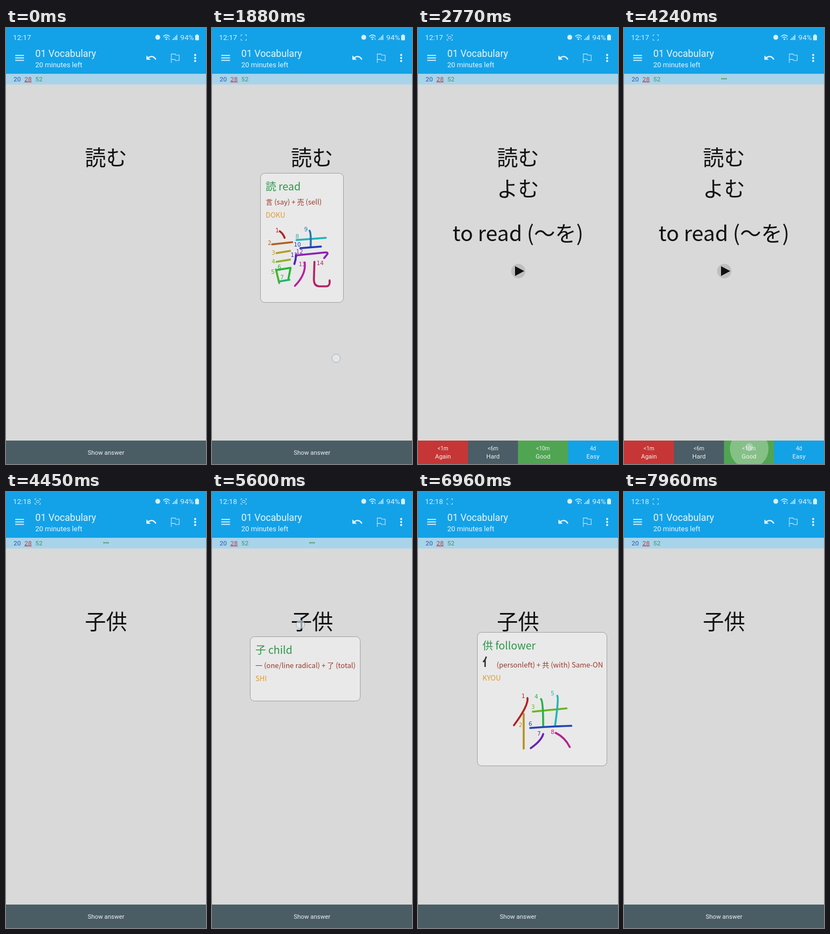
An HTML page that plays this animation: 369x800 px, repeating every 8 s.

```html
<!DOCTYPE html>
<html lang="en">
<head>
<meta charset="utf-8">
<title>Flashcard review</title>
<style>
  html, body { margin: 0; width: 100%; height: 100%; overflow: hidden; background: #d9d9d9; }
  svg { display: block; width: 369px; height: 800px; font-family: Roboto, sans-serif; }
  .card, .pop { font-family: "Noto Sans CJK JP", "Noto Sans CJK", "Noto Sans", sans-serif; }
  .card { font-size: 39px; fill: #111; text-anchor: middle; }
  .pop { font-size: 13px; }
  .pop .head { font-size: 19.4px; fill: #2b9648; }
  .pop .parts { fill: #9c3a2b; }
  .pop .on { fill: #dc9c31; }
  .pop .num { font: 10.3px "DejaVu Sans", sans-serif; }
  .ink { fill: none; stroke-width: 3.6; stroke-linecap: round; stroke-linejoin: round; }
  .line { fill: none; stroke: #e4f3fb; }
  .bottom { fill: #eef1f2; font-size: 11.4px; text-anchor: middle; }
  .bottom .due { font-size: 10px; }
  .count { font-size: 11.8px; }
</style>
</head>
<body>
<svg viewBox="0 0 369 800">
  <defs>
    <clipPath id="barClip"><path d="M0 757h369v43H0z"/></clipPath>
    <clipPath id="goodClip"><path d="M184 757h93v43h-93z"/></clipPath>
  </defs>
  <rect width="369" height="800" fill="#d9d9d9"/>

  <rect width="369" height="84" fill="#13a2e8"/>
  <g fill="#d9effa">
    <text id="clock" x="13" y="22" font-size="13.4">12:17</text>
    <text x="321.5" y="22" font-size="13.6">94%</text>
    <circle cx="280" cy="17" r="4.5"/>
    <rect x="349" y="13" width="7" height="9.5" rx="1"/>
    <rect x="351" y="11.8" width="3" height="2"/>
    <path d="M307 22v-2h1.5v2zM309.5 22v-4.5h1.5v4.5zM312 22v-7h1.5v7zM314.5 22v-9.5h1.5v9.5z"/>
    <circle cx="296" cy="20.5" r="1.5"/>
    <path d="M300.5 22v-3.5h1v3.5z"/>
  </g>
  <g class="line" stroke-width="1.3">
    <path d="M290 15.500q6-5.500 12 0M292.500 18q3.500-3 7 0"/>
    <g id="scan" stroke="#bfe4f7" stroke-width="1">
      <path d="M53.500 15v-2.500h2.500M61 12.500h2.500v2.500M63.500 20v2.500h-2.500M56 22.500h-2.500v-2.500"/>
      <rect id="scanCore" x="56" y="15.500" width="5" height="4" rx="1"/>
    </g>
    <path d="M17 50.300h16.200M17 54.800h16.200M17 59.300h16.200" stroke-width="1.800"/>
    <path d="M305 64V47.600h7l1 2.200h6.500v10h-6.700l-1-2.200H305" stroke="#c8e6f7" stroke-width="1.100"/>
  </g>
  <g fill="#eaf5fb">
    <text x="54" y="53" font-size="17.700">01 Vocabulary</text>
    <text x="54" y="71.500" font-size="13">20 minutes left</text>
    <path transform="translate(257.200 44) scale(.898)" d="M12.500 8c-2.650 0-5.050 1-6.900 2.600L2 7v9h9l-3.600-3.600c1.400-1.200 3.100-1.900 5.100-1.900 3.500 0 6.500 2.300 7.600 5.500l2.400-.8C21.100 11 17.100 8 12.500 8z"/>
    <circle cx="349" cy="49.500" r="1.900"/><circle cx="349" cy="55" r="1.900"/><circle cx="349" cy="60.500" r="1.900"/>
  </g>

  <rect y="84" width="369" height="19.500" fill="#a7d4ea"/>
  <g class="count">
    <text x="14" y="97.500" fill="#3450b4">20</text>
    <text x="34" y="97.500" fill="#c33a45" text-decoration="underline">28</text>
    <text x="54" y="97.500" fill="#478f62">52</text>
  </g>
  <g id="dots" fill="#4b9b58">
    <circle cx="181" cy="93.200" r="1.350"/><circle cx="184.600" cy="93.200" r="1.350"/><circle cx="188.200" cy="93.200" r="1.350"/>
  </g>

  <g class="card">
    <text id="word" x="184.500" y="252.200">読む</text>
    <g id="answer">
      <text x="184.500" y="309">よむ</text>
      <text x="184.500" y="390.500">to read (〜を)</text>
      <circle cx="185" cy="446" r="13.200" fill="#bfbfbf"/>
      <path d="M179 437l17 9-17 9z"/>
    </g>
  </g>

  <g class="bottom">
    <rect y="757" width="369" height="43" fill="#4a5d65"/>
    <circle id="showRipple" cx="211" cy="775" fill="#fff" clip-path="url(#barClip)"/>
    <text x="184.500" y="783">Show answer</text>
    <g id="buttons"></g>
  </g>

  <g id="popups"></g>
  <circle id="touch" r="7.700" fill="#eaeef4" fill-opacity=".6" stroke="#8d9fb5" stroke-opacity=".75"/>
</svg>
<script>
const LOOP = 8000;
const $ = id => document.getElementById(id);
const clamp = v => Math.max(0, Math.min(1, v));
const setOpacity = (el, v) => el.setAttribute('opacity', v);
// Opacity of something visible from a to b, with optional fades.
const vis = (t, a, b, out = 0, inn = 0) =>
  t < a ? 0 : t < b ? (inn ? clamp((t - a) / inn) : 1) : out ? clamp(1 - (t - b) / out) : 0;

const buttons = [
  ['<1m', 'Again', '#c63636'], ['<6m', 'Hard', '#4b5d66'],
  ['<10m', 'Good', '#50a552'], ['4d', 'Easy', '#13a2e6'],
];
const buttonText = (i, due, name) => {
  const x = 46.1 + i * 92.25;
  return `<text class="due" x="${x}" y="775">${due.replace('<', '&lt;')}</text><text x="${x}" y="789.5">${name}</text>`;
};
$('buttons').innerHTML =
  buttons.map(([, , color], i) => `<rect x="${i * 92.25}" y="757" width="92.5" height="43" fill="${color}"/>`).join('') +
  buttons.map(([due, name], i) => buttonText(i, due, name)).join('') +
  '<g clip-path="url(#goodClip)"><circle id="goodRipple" cx="231" cy="772" fill="#fff"/></g>';

// Each stroke: path, then the position of its number.
const popups = [
  {
    x: 89.5, y: 266.5, w: 153, h: 237, head: [298, '読 read'], parts: '言 (say) + 売 (sell)', on: 'DOKU',
    from: 1020, grow: 1150, to: 2020,
    strokes: [
      ['M125 373q6 4 9 12', 117, 375], ['M111 397l37-4', 103, 398],
      ['M119 413l25-4', 110, 416], ['M119 429l25-4', 110, 432],
      ['M118 443l6 25', 109, 451], ['M120 444l25-4-4 20', 121, 442],
      ['M124 465l19-3', 126, 461], ['M156 389l54-4', 154, 386],
      ['M180 372q3 4 2 30', 170, 373], ['M163 404l38-3', 151, 401],
      ['M155 416q0 9-3 17', 145, 420], ['M157 417l50-5q9-1 5 4l-5 6', 155, 414],
      ['M171 430q3 22-18 43', 160, 437], ['M189 429l-1 32q0 13 10 13h13q7 0 6-11', 193, 435],
    ],
  },
  {
    x: 70.5, y: 265.5, w: 203, h: 237, head: [297, '子 child'], parts: '一 (one/line radical) + 了 (total)', on: 'SHI',
    from: 5590, grow: 5670, to: 6420,
    strokes: [
      ['M147 377l43-4q8 0 2 6-8 9-20 15', 138, 376],
      ['M172 394q13 38 3 75-3 9-17-4', 162, 404],
      ['M117 420l110-5', 110, 416],
    ],
  },
  {
    x: 109.5, y: 257.5, w: 239, h: 245, head: [289, '供 follower'], parts: '(personleft) + 共 (with) Same-ON', on: 'KYOU',
    from: 6480, grow: 6560, to: 7560, partsX: 26, radical: true,
    strokes: [
      ['M202 378q2 14-25 50', 191, 378], ['M195 407v64', 186, 431],
      ['M212 403l62-6', 209, 398], ['M227 380q4 4 4 51', 215, 379],
      ['M257 374q3 4-4 54', 245, 373], ['M207 433q40-3 76-4', 204, 429],
      ['M231 444q-3 12-23 26', 220, 447], ['M254 442q17 8 26 26', 245, 444],
    ],
  },
];

$('popups').innerHTML = popups.map(p => {
  const x = p.x + 9.5, y = p.head[0], base = p.radical ? 322 : y + 25.5;
  const strokes = p.strokes.map(([d, lx, ly], i) => {
    const color = `hsl(${i * 360 / p.strokes.length} 68% 42%)`;
    return `<path class="ink" stroke="${color}" d="${d}"/><text class="num" fill="${color}" x="${lx}" y="${ly}">${i + 1}</text>`;
  }).join('');
  const radical = p.radical
    ? '<path fill="none" stroke="#333" stroke-width="2.6" d="M126 302q-1 5-6 10M123.800 307v14"/>' : '';
  return `<g class="pop">
    <rect x="${p.x}" y="${p.y}" width="${p.w}" rx="8" fill="#e9e9e9" stroke="#a0a0a0"/>
    <text class="head" x="${x}" y="${y}">${p.head[1]}</text>${radical}
    <text class="parts" x="${x + (p.partsX || 0)}" y="${base}">${p.parts}</text>
    <text class="on" x="${x}" y="${base + 24}">${p.on}</text>
    <g class="strokes">${strokes}</g></g>`;
}).join('');
popups.forEach((p, i) => {
  p.el = $('popups').children[i];
  p.box = p.el.querySelector('rect');
  p.ink = p.el.querySelector('.strokes');
});

// x, y, press, release
const taps = [
  [163, 243, 950, 1150], [229, 606, 1870, 2010], [211, 775, 2360, 2490], [231, 769, 4100, 4215],
  [163, 243, 5530, 5740], [203, 243, 6350, 6560], [229, 606, 7490, 7630],
];

function ripple(el, t, start, reach, end, strength) {
  const k = clamp((t - start) / 250);
  el.setAttribute('r', 8 + reach * k);
  setOpacity(el, strength * vis(t, start, end, 120));
}

function draw(t) {
  const second = t >= 4380;
  $('clock').textContent = second ? '12:18' : '12:17';
  $('word').textContent = second ? '子供' : '読む';
  setOpacity($('answer'), vis(t, 2490, 4380));
  setOpacity($('buttons'), vis(t, 2490, 4330, 110, 270));
  setOpacity($('dots'), vis(t, 4230, 6350));
  setOpacity($('scan'), vis(t, 395, LOOP, 0, 200));
  setOpacity($('scanCore'), (t + 683) % 1013 < 535 ? 1 : 0);
  ripple($('showRipple'), t, 2360, 120, 2490, .2);
  ripple($('goodRipple'), t, 4100, 49, 4310, .3);

  for (const p of popups) {
    const full = t >= p.grow;
    setOpacity(p.el, vis(t, p.from, p.to, 80));
    p.box.setAttribute('height', full ? p.h : 118);
    setOpacity(p.ink, full ? 1 : 0);
  }

  const tap = taps.find(([, , a, b]) => t >= a && t < b + 60);
  setOpacity($('touch'), tap ? vis(t, tap[2], tap[3], 60) : 0);
  if (tap) {
    $('touch').setAttribute('cx', tap[0]);
    $('touch').setAttribute('cy', tap[1]);
  }
}

const start = performance.now();
function frame() {
  draw((performance.now() - start) % LOOP);
  requestAnimationFrame(frame);
}
frame();
</script>
</body>
</html>
```
